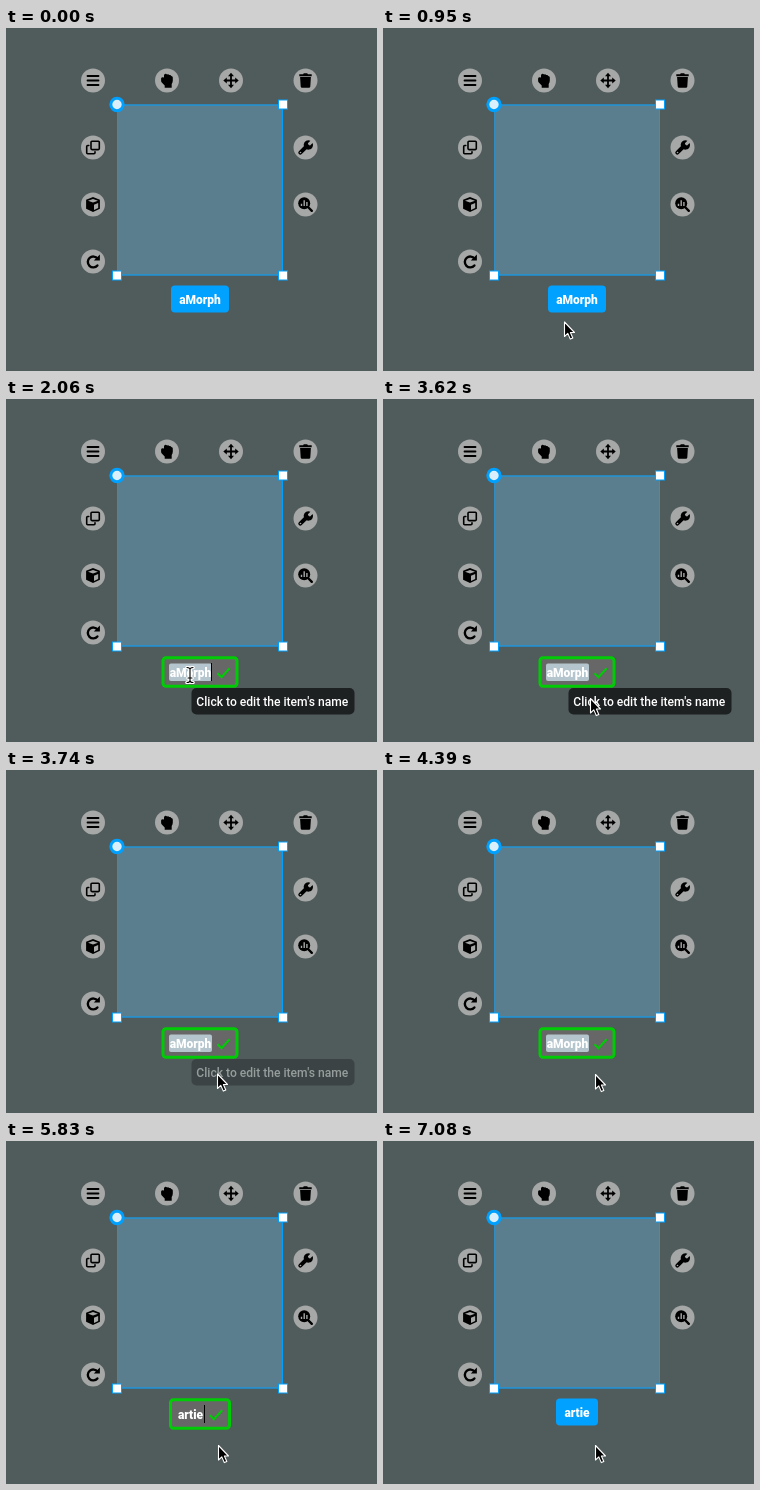
These frames come from a looping animation (371 px wide and 343 px high, 8 s). An HTML page:

```html
<!DOCTYPE html>
<html lang="en">
<head>
<meta charset="utf-8">
<title>Rename a morph</title>
<style>
  html, body { margin: 0; width: 100%; height: 100%; overflow: hidden; background: #505b5b; }
  svg { display: block; width: 371px; height: 343px; }
  text { font-family: Roboto, "Noto Sans", sans-serif; fill: #fff; }
  .name { font-size: 12px; font-weight: 800; text-anchor: middle; }
  .disc { fill: #a6a7a7; }
  .line { fill: none; stroke: #000; stroke-width: 1.8; stroke-linecap: round; stroke-linejoin: round; }
  .thin { stroke-width: 1.6; }
  .thick { stroke-width: 2.4; }
  .grip { fill: #fff; stroke: #00a0ff; }
  .edge { fill: none; stroke: #00a0ff; }
  .pointer { stroke: #fff; stroke-width: 1.1; stroke-linejoin: round; }
  .beam { fill: none; stroke-linecap: round; }
</style>
</head>
<body>
<svg viewBox="0 0 371 343">
  <rect width="371" height="343" fill="#505b5b"/>

  <!-- selected morph -->
  <rect x="111" y="76.5" width="166" height="171" fill="#5a7e8e"/>
  <path class="edge" d="M111 77H276.5V247H111"/>
  <path class="edge" d="M111.5 77V247" opacity=".45"/>
  <rect class="grip" x="272.5" y="72" width="9" height="9"/>
  <rect class="grip" x="106.5" y="243" width="9" height="9"/>
  <rect class="grip" x="272.5" y="243" width="9" height="9"/>
  <circle cx="111" cy="76.5" r="6.2" fill="#d9effb" stroke="#00a0ff" stroke-width="3"/>

  <!-- halo buttons -->
  <g transform="translate(87 52.5)">
    <circle class="disc" r="12"/>
    <path class="line" d="M-5.5 -4.5H5.5M-5.5 0H5.5M-5.5 4.5H5.5"/>
  </g>
  <g transform="translate(161 52.5)">
    <circle class="disc" r="12"/>
    <path d="M-3 -5.3Q-2.8 -6.8 -1.5 -6.8Q-.5 -6.9 0 -6.1Q1.6 -6.8 2.3 -5.4Q3.8 -5.8 4.3 -4.5Q5.8 -4.5 5.8 -3V.2Q5.7 2.2 4.7 3.6V7.2H-2.3V4.9L-5.2 2Q-5.9 1.2 -5.9 .2V-2Q-5.7 -3.2 -4.3 -3.3L-3 -3Z"/>
  </g>
  <g transform="translate(225 52.5)">
    <circle class="disc" r="12"/>
    <path class="line" d="M-5 0H5M0 -5V5"/>
    <path d="M0 -7.7L3 -4.2H-3ZM0 7.7L3 4.2H-3ZM-7.7 0L-4.2 -3V3ZM7.7 0L4.2 -3V3Z"/>
  </g>
  <g transform="translate(299.5 52.5)">
    <circle class="disc" r="12"/>
    <path d="M-6.2 -6.2H-2.4L-1.7 -7.2H1.7L2.4 -6.2H6.2V-4.3H-6.2ZM-5.4 -3.4H5.4L4.8 6Q4.7 7.3 3.4 7.3H-3.4Q-4.7 7.3 -4.8 6Z"/>
  </g>
  <g transform="translate(87 119.5)">
    <circle class="disc" r="12"/>
    <rect class="line thin" x="-2" y="-6.2" width="8.3" height="8.3" rx="1"/>
    <path class="line thin" d="M-4.2 -2H-5.3Q-6.3 -2 -6.3 -1V5.2Q-6.3 6.2 -5.3 6.2H1Q2 6.2 2 5.2V4.2"/>
  </g>
  <g transform="translate(87 176.5)">
    <circle class="disc" r="12"/>
    <path d="M0 -7.4L6.9 -4.8V4.3L0 7.6L-6.9 4.3V-4.8Z"/>
    <path d="M-5 -3.8L0 -1.9L5 -3.8L0 -5.6ZM1 .2L5.2 -1.6V3.4L1 5.4Z" fill="#a6a7a7"/>
  </g>
  <g transform="translate(87 233.5)">
    <circle class="disc" r="12"/>
    <path class="line thick" d="M4.6 -2.7A5.4 5.4 0 1 0 4.4 3.9"/>
    <path d="M6.9 -6.9V-.9H.8Z"/>
  </g>
  <g transform="translate(299.5 119.5)">
    <circle class="disc" r="12"/>
    <path class="line" d="M-5.2 5.2L1.5 -1.5" style="stroke-width:4"/>
    <path d="M4.9 -6.8L2.4 -4.3L2.8 -2.4L4.6 -2.1L7.1 -4.6A4.7 4.7 0 1 1 4.9 -6.8Z"/>
    <circle cx="-5" cy="5" r=".8" fill="#a6a7a7"/>
  </g>
  <g transform="translate(299.5 176.5)">
    <circle class="disc" r="12"/>
    <circle cx="-1.3" cy="-1.3" r="6"/>
    <path class="line thick" d="M3 3L6.3 6.3"/>
    <path d="M-4 -.8V1.6M-1.3 -4.2V1.6M1.4 -2.4V1.6" fill="none" stroke="#a6a7a7" stroke-width="1.4"/>
  </g>

  <!-- name label -->
  <g id="label">
    <rect id="pill" y="257.5" height="27" rx="4" fill="#00a1ff"/>
    <text id="title" class="name" x="194" y="276"></text>
  </g>

  <!-- name editor -->
  <g id="editor">
    <rect id="field" y="258.8" height="28.4" rx="3" fill="#666766" stroke="#00cc05" stroke-width="3"/>
    <rect id="marked" x="163" y="264.5" width="43" height="17.5" rx="2" fill="#b5c5cd"/>
    <text id="typed" class="name" x="184.5" y="278"></text>
    <rect id="caret" y="264" width="1" height="18" fill="#000"/>
    <path id="tick" d="M-21 274.3L-17 278.3L-8.8 269.3" fill="none" stroke="#00cc05" stroke-width="2.1"/>
  </g>

  <g id="tip">
    <rect x="185.5" y="289" width="163" height="26.5" rx="5" fill="#1e2122"/>
    <text x="190.3" y="307" font-size="12.1" font-weight="500">Click to edit the item's name</text>
  </g>

  <g id="cursor">
    <path id="arrow" class="pointer" d="M.5 .5V15L3.8 11.9L6.3 17.6L8.8 16.5L6.4 11H10.5Z"/>
    <path id="hand" class="pointer" d="M-1.5 6V-1.2Q-1.5 -2.5 -.2 -2.5Q1.2 -2.5 1.2 -1.2V3.2Q3.5 2.4 4 4Q6 3.4 6.4 5Q8.7 4.6 8.7 6.8V9.5Q8.6 11.5 7 13.5V15H-.5V13.5L-5 7.5Q-5.8 6 -4.4 5.5Q-3.2 5.2 -1.5 7.5Z"/>
    <g id="beam">
      <path id="stem" class="beam" d="M-3 -7.5Q0 -7.5 0 -5.5V5.5Q0 7.5 -3 7.5M3 -7.5Q0 -7.5 0 -5.5M0 5.5Q0 7.5 3 7.5M-2 3H2" stroke="#fff" stroke-width="3.2"/>
      <use href="#stem" class="core"/>
      <path class="beam" d="M-3 -7.5Q0 -7.5 0 -5.5V5.5Q0 7.5 -3 7.5M3 -7.5Q0 -7.5 0 -5.5M0 5.5Q0 7.5 3 7.5M-2 3H2" stroke="#000" stroke-width="1.1"/>
    </g>
  </g>
</svg>
<script>
const LOOP = 8000, MID = 194;
const EDIT = 1880, TYPE = 5230, DONE = 7080;
const el = {};
document.querySelectorAll('[id]').forEach(node => el[node.id] = node);

// time, x, y, shape
const moves = [
  [0, 0, 0, ''],
  [720, 192, 337, 'arrow'], [780, 190, 326, 'arrow'], [840, 187, 313, 'arrow'],
  [890, 183, 302, 'arrow'], [950, 181, 293.5, 'arrow'], [1010, 180, 288, 'arrow'],
  [1080, 182, 281, 'hand'], [1140, 182, 275, 'hand'], [1200, 182, 271, 'hand'],
  [1260, 183, 271, 'hand'], [1310, 184, 274, 'hand'], [1370, 184, 276, 'hand'],
  [EDIT, 184, 276, 'beam'],
  [3560, 198, 290, 'arrow'], [3620, 207, 299, 'arrow'], [3680, 210, 302.5, 'arrow'],
  [3740, 211, 303.5, 'arrow'], [3800, 212, 304, 'arrow']
];
// time, text, half width of the field
const names = [
  [0, 'aMorph', 38.5], [TYPE, 'a', 20], [5350, 'ar', 22],
  [5530, 'art', 23.5], [5650, 'arti', 27], [5830, 'artie', 31]
];
const fades = [
  [0, 0], [EDIT, .35], [1940, .7], [2060, 1],
  [3680, .75], [3740, .4], [3800, .15], [3860, 0]
];
const blinks = [
  [EDIT, 1], [2360, 0], [2900, 1], [3380, 0], [3860, 1], [4390, 0],
  [4870, 1], [6310, 0], [6790, 1]
];

const at = (list, t) => list.reduce((last, step) => step[0] <= t ? step : last);
const show = (node, on) => node.style.display = on ? '' : 'none';
const set = (node, attrs) => {
  for (const key in attrs) node.setAttribute(key, attrs[key]);
};

function draw(t) {
  const [, x, y, shape] = at(moves, t);
  set(el.cursor, { transform: `translate(${x} ${y})` });
  for (const kind of ['arrow', 'hand', 'beam']) show(el[kind], kind === shape);

  const [, name, half] = at(names, t);
  const editing = t >= EDIT && t < DONE;
  const pillHalf = t < DONE ? 29 : 21;
  show(el.label, !editing);
  show(el.editor, editing);
  el.title.textContent = el.typed.textContent = name;
  set(el.pill, { x: MID - pillHalf, width: 2 * pillHalf });
  set(el.field, { x: MID - half + 1.5, width: 2 * half - 3 });
  set(el.caret, { x: Math.round(MID + half - 27.5) });
  set(el.tick, { transform: `translate(${MID + half} 0)` });
  show(el.marked, t < TYPE);
  show(el.caret, at(blinks, t)[1]);
  el.tip.style.opacity = at(fades, t)[1];
}

function tick() {
  draw(performance.now() % LOOP);
  requestAnimationFrame(tick);
}
tick();
</script>
</body>
</html>
```
